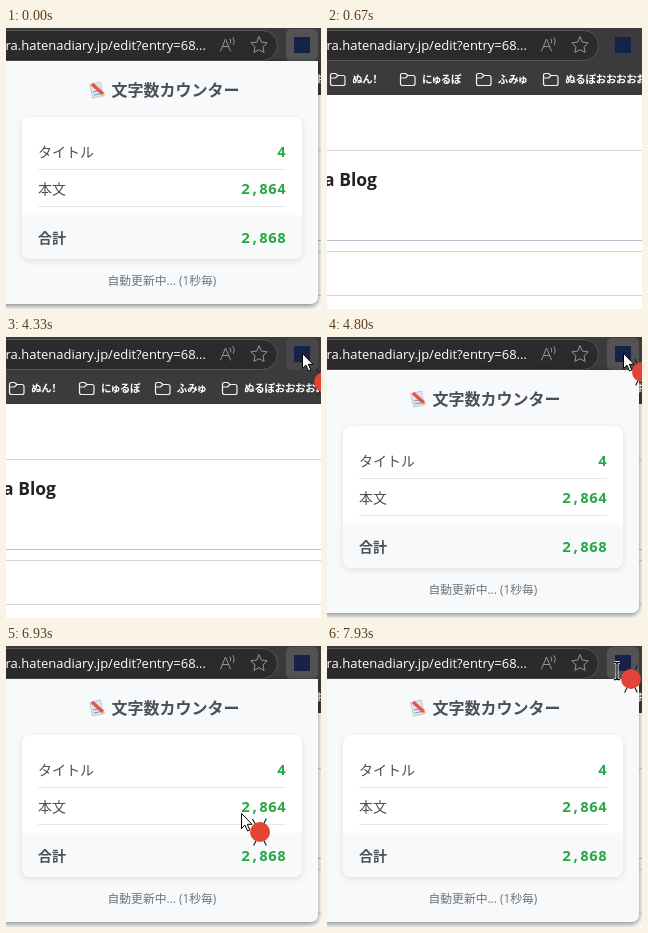
Animation, 315 px wide and 281 px high, one loop 8000 ms. Source, as an HTML page:

```html
<!DOCTYPE html>
<html lang="ja">
<head>
<meta charset="utf-8">
<title>文字数カウンター</title>
<style>
  html, body { margin: 0; width: 100%; height: 100%; overflow: hidden; background: #fff; }
  svg { display: block; width: 100%; height: 100%; }
  text { font-family: "Open Sans", "Noto Sans CJK JP", "Noto Sans CJK", sans-serif; }
  .line { shape-rendering: crispEdges; }
  .jp, .mark { font-family: "Noto Sans CJK JP", "Noto Sans CJK", sans-serif; }
  .jp { fill: #495057; font-size: 14px; }
  .mark { fill: #fff; font-size: 10.5px; font-weight: 700; font-feature-settings: "palt"; }
  .num { font-family: "Noto Sans Mono", monospace; font-size: 15px; font-weight: 700; fill: #28a745; text-anchor: end; }
  #title { font-size: 16px; }
  #title, .total { font-weight: 700; }
  #popup { filter: drop-shadow(0 2px 3px rgba(0, 0, 0, .5)); }
  #card { filter: drop-shadow(0 2px 3px rgba(0, 0, 0, .1)); }
</style>
</head>
<body>
<svg viewBox="0 0 315 281">
  <defs>
    <path id="folder" d="M.5 2.5Q.5 .5 2.5 .5H5.5L8 2.5H13Q15 2.5 15 4.5V10.5Q15 12.5 13 12.5H2.5Q.5 12.5 .5 10.5ZM.5 5H5.5L8 2.5"/>
    <path id="beamShape" d="M-3 -8.5H-1L0 -7.5 1 -8.5H3M0 -7.5V7.5M-3 8.5H-1L0 7.5 1 8.5H3"/>
    <clipPath id="cardClip"><rect x="16" y="89" width="280" height="142" rx="8"/></clipPath>
  </defs>

  <rect width="315" height="281" fill="#fff"/>
  <g id="rules" class="line" fill="#d1d5da"></g>
  <text x="50" y="158" font-size="17.5" font-weight="700" fill="#222" text-anchor="end">a Blog</text>

  <!-- browser bars -->
  <rect class="line" width="315" height="67" fill="#3b3b3b"/>
  <rect x="-60" y="2.5" width="331.5" height="30" rx="15" fill="#2b2b2b" stroke="#555"/>
  <text x="200" y="22" font-size="13" fill="#fff" text-anchor="end">ra.hatenadiary.jp/edit?entry=68...</text>
  <g fill="none" stroke="#959595" stroke-linecap="round" stroke-linejoin="round">
    <path d="M214.5 23 219.5 11 224.5 23M216.5 18.5H222.5"/>
    <path d="M224 11Q225.5 13 224.5 15M227 9.5Q229.5 13 227.5 16.5"/>
    <path id="star"/>
  </g>
  <g id="marks"></g>
  <rect id="button" x="280" y="1" width="32" height="32" rx="5" fill="#535353"/>
  <rect x="288" y="9" width="16" height="16" fill="#16224a"/>

  <g id="popup">
    <rect x="-20" y="33" width="332" height="243" rx="7" fill="#f8f9fa"/>
    <rect x="290" y="33" width="22" height="10" fill="#f8f9fa"/>
    <g transform="translate(91 62)">
      <rect x="-6" y="-7" width="11" height="14" transform="rotate(-12)" fill="#dfe5ec" stroke="#b4bfca" stroke-width=".7"/>
      <path d="M-4 2 2 .7M-3 5 4 3.5" stroke="#7d93ad"/>
      <path d="M-5 -6 6 4" stroke="#e2574c" stroke-width="3.5"/>
      <path d="M6 4 7.5 5.4" stroke="#f3c588" stroke-width="2.5"/>
    </g>
    <text class="jp" id="title" x="105.5" y="68">文字数カウンター</text>
    <g id="card"><g clip-path="url(#cardClip)">
      <rect x="16" y="89" width="280" height="142" fill="#fff"/>
      <rect x="16" y="187" width="280" height="44" fill="#f8f9fa"/>
    </g></g>
    <g id="rows"></g>
    <text x="101.5" y="257" font-size="11.8" fill="#6c757d">自動更新中... (1秒毎)</text>
  </g>

  <g id="bug">
    <path id="legs" fill="none" stroke="#222" stroke-width="1.2"/>
    <circle r="10" fill="#e24335"/>
  </g>
  <path id="arrow" d="M.5 .5V15.5L4 12.2 6.5 18 8.8 17 6.3 11.3H11Z" fill="#fff" stroke="#000"/>
  <g id="beam" fill="none">
    <use href="#beamShape" stroke="#fff" stroke-width="3"/>
    <use href="#beamShape" stroke="#000" stroke-width="1.3"/>
  </g>
</svg>
<script>
const LOOP = 8000, STEP = 1000 / 15;
const APPEAR = 3260, BUG_IN = 4060, OPEN = 4533, ON_TEXT = 7650;
const $ = id => document.getElementById(id);
const progress = (t, start, length) => Math.max(0, Math.min(1, (t - start) / length));
const smooth = u => u * u * (3 - 2 * u);

// Turning points of the pointer
const turns = [
  { t: 3267, x: 308, y: 63 },
  { t: 3600, x: 290, y: 25 },
  { t: 3800, x: 296, y: 16 },
  { t: 6000, x: 296, y: 16 },
  { t: 6467, x: 308, y: 256 },
  { t: 6733, x: 165, y: 215 },
  { t: 6867, x: 268, y: 175 },
  { t: 7067, x: 138, y: 142 },
  { t: 7333, x: 207, y: 218 },
  { t: 7933, x: 154, y: 263 }
];

function pointerAt(t) {
  const i = Math.max(1, turns.findIndex(p => p.t >= t));
  const a = turns[i - 1], b = turns[i];
  const u = smooth(progress(t, a.t, b.t - a.t));
  return { x: a.x + (b.x - a.x) * u, y: a.y + (b.y - a.y) * u };
}

// The bug rises to the pointer, then rides beside it
function bugAt(t, pointer, onText) {
  const rise = 1 - smooth(progress(t, 4000, 667));
  const [dx, dy] = onText ? [14, 8] : [19, 19];
  return { x: pointer.x + dx + 6 * rise, y: pointer.y + dy + 20 * rise };
}

function place(id, { x, y }, shown) {
  $(id).setAttribute("transform", `translate(${Math.round(x)} ${Math.round(y)})`);
  $(id).setAttribute("visibility", shown ? "visible" : "hidden");
}

const polar = (r, a) => `${r * Math.cos(a)} ${r * Math.sin(a)}`;

function buildStatic() {
  $("rules").innerHTML = [122, 212, 223, 267].map(y =>
    `<rect y="${y}" width="315" height="1"${y === 212 ? ' fill="#b5c0cc"' : ""}/>`).join("");

  const points = Array.from({ length: 10 }, (_, i) => polar(i % 2 ? 4.2 : 8.6, (i / 5 - 0.5) * Math.PI));
  $("star").setAttribute("d", `M${points.join("L")}Z`);
  $("star").setAttribute("transform", "translate(253 17.5)");

  const legs = [-120, -65, 65, 115].map(deg => deg * Math.PI / 180);
  $("legs").setAttribute("d", legs.map(a => `M${polar(9, a)}L${polar(15, a)}`).join(""));

  const folders = { "ぬん！": 3, "にゅるぽ": 73, "ふみゅ": 149, "ぬるぽおおおおおおお": 216 };
  $("marks").innerHTML = Object.entries(folders).map(([name, x]) =>
    `<use href="#folder" x="${x}" y="45" fill="none" stroke="#f2f2f2" stroke-width="1.2"/>
     <text class="mark" x="${x + 22}" y="55">${name}</text>`).join("");

  const rows = [["タイトル", 4, 129], ["本文", 2864, 166], ["合計", 2868, 215]];
  $("rows").innerHTML = rows.map(([label, count, y], i) =>
    `<text class="jp${i === 2 ? " total" : ""}" x="32" y="${y}">${label}</text>
     <text class="num" x="280" y="${y}">${count.toLocaleString("en-US")}</text>` +
    (i < 2 ? `<rect class="line" x="32" y="${y + 12}" width="248" height="1" fill="#e6e9ec"/>` : "")).join("");
}

function draw(now) {
  const t = Math.floor((now % LOOP + 5) / STEP) * STEP % LOOP;
  const early = t < APPEAR;
  const popup = early ? 1 - progress(t, 333, 333) : progress(t, OPEN, 266);
  const hover = early ? popup : t > OPEN + 1 ? 1 : 0.5 * progress(t, 3500, 130);
  $("popup").setAttribute("opacity", popup);
  $("button").setAttribute("opacity", hover);

  const onText = t > ON_TEXT, pointer = pointerAt(t);
  place("arrow", pointer, !early && !onText);
  place("beam", pointer, onText);
  place("bug", bugAt(t, pointer, onText), t > BUG_IN);
  requestAnimationFrame(draw);
}

buildStatic();
draw(0);
</script>
</body>
</html>
```
